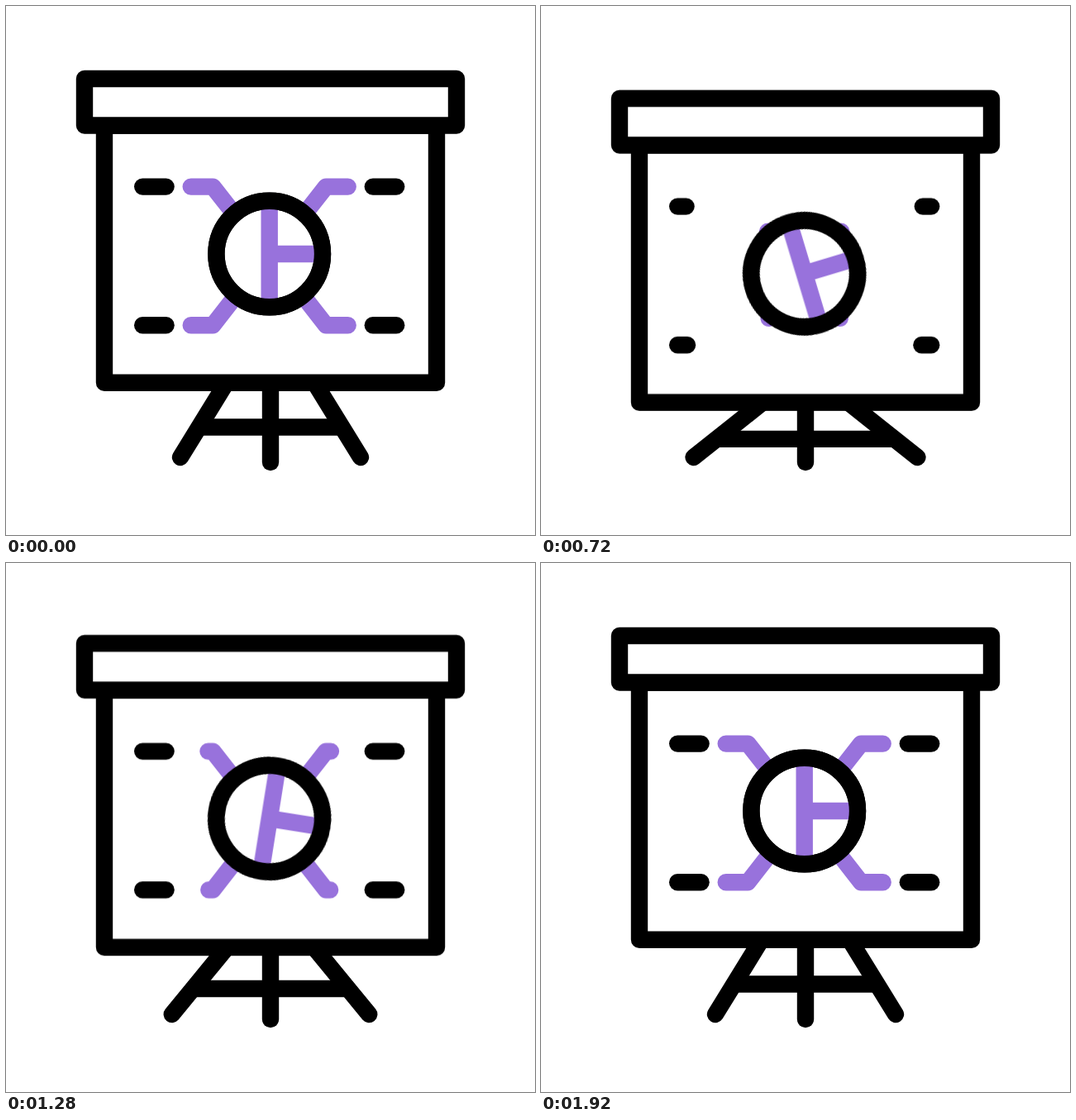
Animation, 640 px wide and 640 px high, one loop 2000 ms. Source, as an HTML page without scripts:

```html
<!DOCTYPE html>
<html lang="en">
<head>
<meta charset="utf-8">
<title>Presentation board</title>
<style>
  html, body { margin: 0; width: 100%; height: 100%; overflow: hidden; background: #fff; }
  svg { display: block; width: 100vw; height: 100vh; }
  path, circle {
    fill: none; stroke: #000; stroke-width: 20.4;
    stroke-linecap: round; stroke-linejoin: round;
  }
  .paper { fill: #fff; }
  .link, .hand { stroke: #9872dc; }
  .bar { stroke-linecap: butt; }
  .link { stroke-dasharray: 100 200; }

  .board, .leg, .bar, .link, .dash, .disc {
    animation: 2s ease-in-out infinite;
  }
  .board { animation-name: drop; }
  .leg { animation-name: spread; }
  .bar { animation-name: widen; }
  .link { animation-name: retract; }
  .dash { animation-name: shrink; }
  .low { --cut: 17.5px; }
  .disc { animation-name: swing; transform-origin: 318.7px 300px; }
  .dash { --len: 28.5px; stroke-dasharray: 28.5 60; }

  @keyframes drop {
    0%, 5.35%, 77.95%, 100% { transform: translateY(0); }
    40.45%, 45.35% { transform: translateY(24.6px); }
  }
  @keyframes spread {
    0%, 5.35%, 77.95%, 100% { d: path("M266.5 456L211 546"); }
    40.45%, 45.35% { d: path("M268 480.6L183.7 546"); }
  }
  @keyframes widen {
    0%, 5.35%, 77.95%, 100% { d: path("M233 509.5L407 509.5"); }
    40.45%, 45.35% { d: path("M212 524.3L428 524.3"); }
  }
  @keyframes retract {
    0%, 14%, 74.1%, 100% { stroke-dashoffset: 0; }
    37%, 48.4% { stroke-dashoffset: -97; }
  }
  @keyframes shrink {
    0%, 8.5%, 55.5%, 100% { stroke-dashoffset: 0; }
    41% { stroke-dashoffset: var(--cut, 19px); }
  }
  @keyframes swing {
    0%, 16%, 96.5%, 100% { transform: rotate(0deg); }
    39.5%, 47.8% { transform: rotate(-17.5deg); }
    67.7% { transform: rotate(11deg); }
  }
</style>
</head>
<body>
<svg viewBox="0 0 640 640">
  <path class="bar" d="M233 509.5L407 509.5"/>
  <path class="leg" d="M266.5 456L211 546"/>
  <g transform="matrix(-1 0 0 1 640 0)">
    <path class="leg" d="M266.5 456L211 546"/>
  </g>
  <path d="M320 456V552"/>

  <g class="board">
    <path class="paper" d="M119 144.5H521V455.8H119Z"/>
    <path class="paper" d="M95 88H545V144.5H95Z"/>

    <g>
      <path class="link" pathLength="100" d="M223.7 218.6H250.3L275.5 250.7"/>
      <path class="link" pathLength="100" d="M223.7 386.3H250.3L277 352"/>
      <path class="dash" d="M165.2 218.6h28.4"/>
      <path class="dash low" d="M165.2 386.3h28.4"/>
    </g>
    <g transform="matrix(-1 0 0 1 637.4 0)">
      <path class="link" pathLength="100" d="M223.7 218.6H250.3L275.5 250.7"/>
      <path class="link" pathLength="100" d="M223.7 386.3H250.3L277 352"/>
      <path class="dash" d="M165.2 218.6h28.4"/>
      <path class="dash low" d="M165.2 386.3h28.4"/>
    </g>

    <g class="disc">
      <circle class="paper" cx="318.7" cy="300" r="64.3"/>
      <path class="hand" d="M318.7 236V364M318.7 300H383"/>
      <circle cx="318.7" cy="300" r="64.3"/>
    </g>
  </g>
</svg>
</body>
</html>
```
